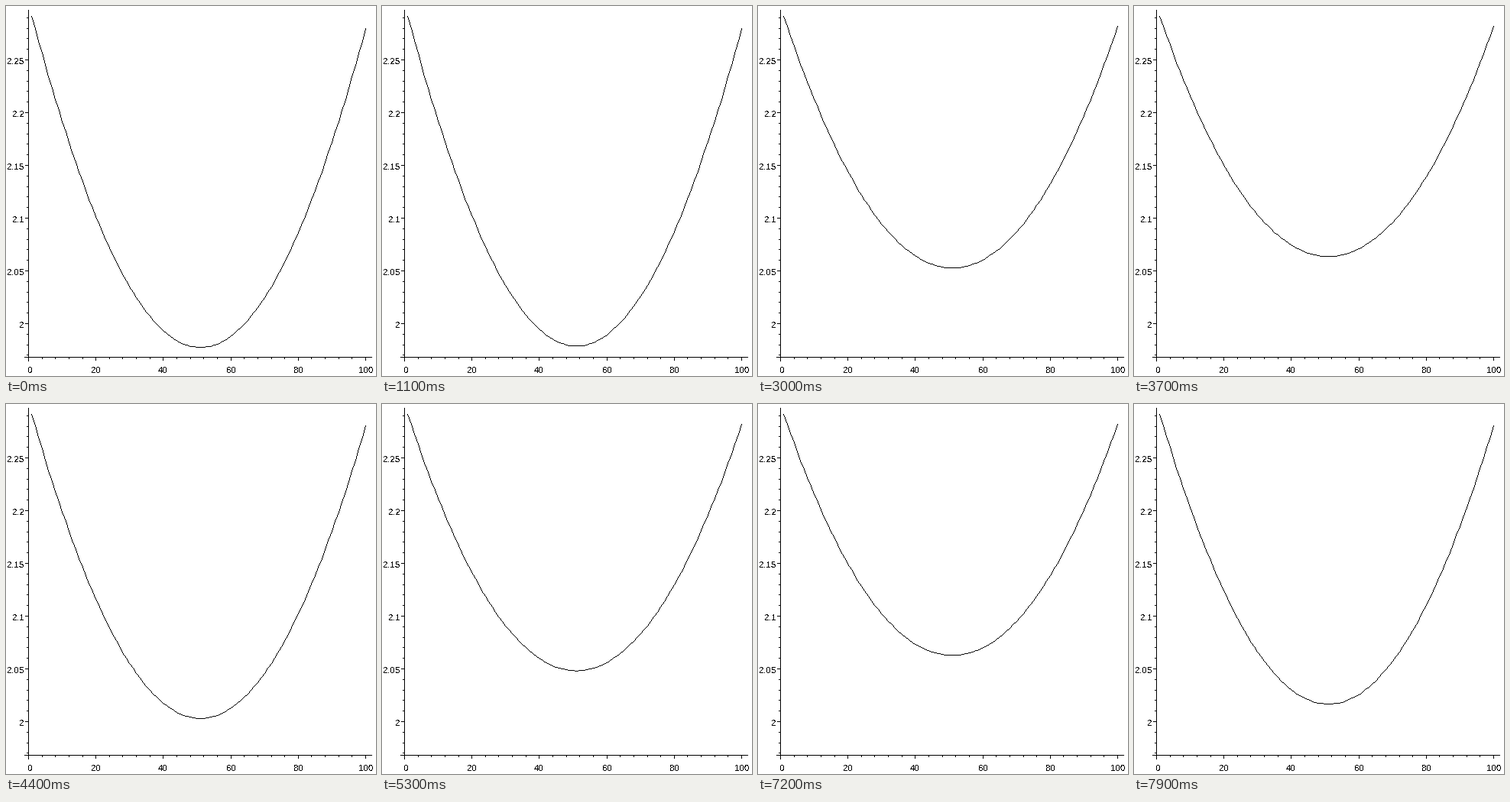
A matplotlib script for the animation above (8 s loop, 484x484 px).

```python
import numpy as np
import matplotlib.pyplot as plt
from matplotlib.animation import FuncAnimation
from matplotlib.collections import PolyCollection
from matplotlib.patches import Rectangle

SIZE, DPI = 484, 100
FRAMES, STEP = 80, 100          # count, ms
AXIS_X, AXIS_Y = 29, 459        # axis lines in pixels, y down
PX_X, PX_Y = 4.41, 1380         # pixels per unit

plt.rcParams["text.antialiased"] = False
plt.rcParams["font.family"] = "Liberation Sans"


def to_x(v):
    return np.round(AXIS_X + PX_X * v)


def to_y(v):
    return np.round(415 - PX_Y * (v - 2))


fig = plt.figure(figsize=(SIZE / DPI, SIZE / DPI), dpi=DPI, facecolor="white")
ax = fig.add_axes([0, 0, 1, 1])
ax.set_xlim(0, SIZE)
ax.set_ylim(SIZE, 0)
ax.axis("off")


def bar(x, y, w, h):
    ax.add_patch(Rectangle((x, y), w, h, fc="black", lw=0, snap=False))


def label(x, y, text, ha):
    ax.text(x, y, text, ha=ha, va="baseline", color="black",
            fontsize=11.5 * 72 / DPI)


bar(24, AXIS_Y, 455, 1)
bar(AXIS_X, 5, 1, 460)

for i in range(-3, 30):
    y = to_y(2 + i / 100)
    length = 4 if i % 5 == 0 else 2
    bar(AXIS_X - length, y, length, 1)
    if i % 5 == 0:
        label(24, y + 6, f"{2 + i / 100:g}", "right")

for v in range(0, 101, 4):
    x = to_x(v)
    bar(x, AXIS_Y + 1, 1, 4 if v % 20 == 0 else 2)
    if v % 20 == 0:
        label(x + (2.5 if v == 0 else 0.5), 480, str(v), "center")

# Hanging string: resting parabola plus its damped lowest mode
nodes = np.arange(1, 101)
u = (nodes - 1) / 100
rest = 344 * 4 * u * (1 - u)
mode = np.sin(np.pi * u)
TOP, AMP, DECAY = 13, 109.5, 0.144
PERIOD, PEAK = 1.146, 1.033

node_x = to_x(nodes)
CELL = np.array([[0, 0], [1, 0], [1, 1], [0, 1]])
curve = PolyCollection([], facecolors="black", linewidths=0, snap=False)
ax.add_collection(curve, autolim=False)


def pixels(xs, ys):
    """Whole-pixel polyline through integer points."""
    steps = np.maximum(abs(np.diff(xs)), abs(np.diff(ys))).astype(int)
    pos = np.concatenate([k + np.arange(n) / n for k, n in enumerate(steps)]
                         + [[len(steps)]])
    idx = np.arange(len(xs))
    pts = np.column_stack([np.interp(pos, idx, xs), np.interp(pos, idx, ys)])
    return np.floor(pts + 0.5)


def draw(i):
    t = i * STEP / 1000
    swing = AMP * np.exp(-DECAY * t) * np.cos(2 * np.pi * (t - PEAK) / PERIOD)
    pts = pixels(node_x, np.round(TOP + rest + swing * mode))
    curve.set_verts(pts[:, None, :] + CELL)
    return (curve,)


anim = FuncAnimation(fig, draw, frames=FRAMES, interval=STEP,
                     repeat=True, repeat_delay=0, blit=False)
plt.show()
```
